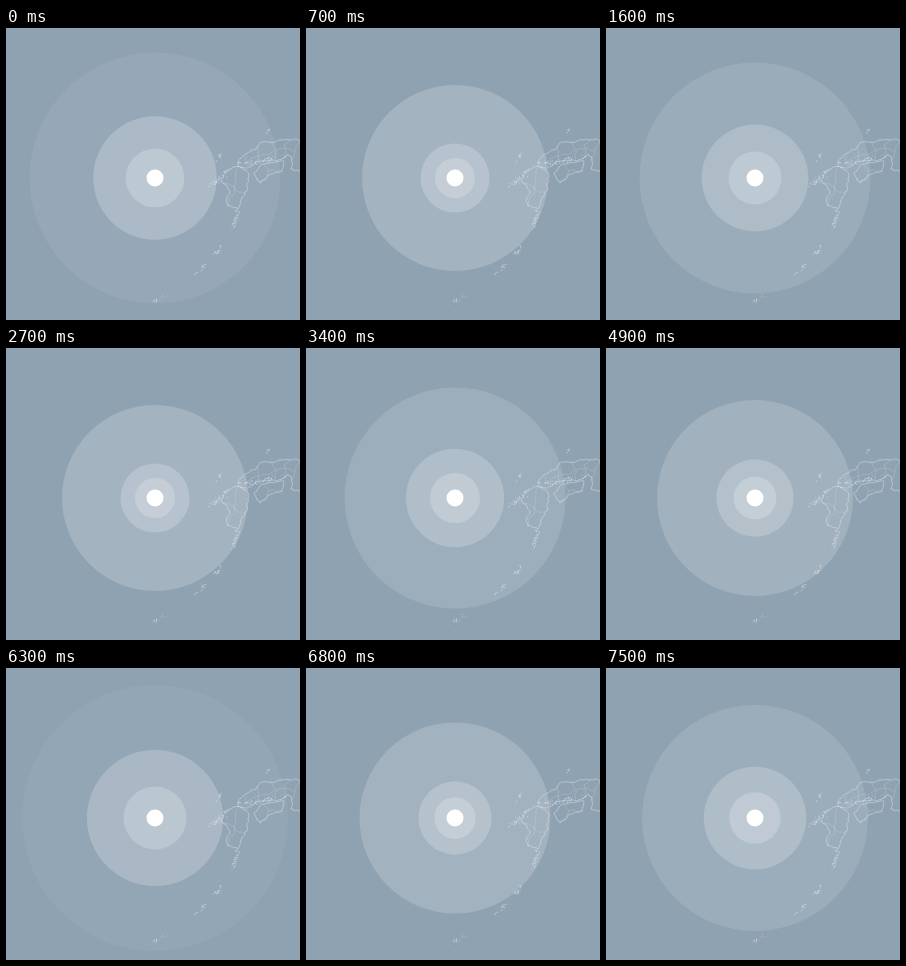
An HTML page for the animation above (7.6 s loop, 294 by 292 pixels).

```html
<!DOCTYPE html>
<html lang="en">
<head>
<meta charset="utf-8">
<title>Pulse on a map</title>
<style>
  html, body { margin: 0; width: 100%; height: 100%; overflow: hidden; background: #8fa2b2; }
  svg { display: block; width: 100%; height: 100%; }
  .coast, .border { fill: none; stroke: #f4f4fa; stroke-linejoin: round; }
  .coast { stroke-width: .7; stroke-opacity: .55; }
  .border { stroke-width: .5; stroke-opacity: .34; }
  .isles { fill: #f4f4fa; fill-opacity: .55; }
</style>
</head>
<body>
<svg viewBox="0 0 294 292">
  <g fill="#fff">
    <circle id="outer" cx="149" cy="150"/>
    <circle id="middle" cx="149" cy="150" fill-opacity=".2"/>
    <circle id="inner" cx="149" cy="150" fill-opacity=".2"/>
  </g>
  <path id="border" class="border"/>
  <path id="coast" class="coast"/>
  <path id="isles" class="isles"/>
  <circle cx="149" cy="150" r="8.5" fill="#fff"/>
</svg>
<script>
  const $ = id => document.getElementById(id);

  let seed = 11;
  const rand = () => (seed = (seed * 16807) % 2147483647) / 2147483647;
  const jitter = size => (rand() - .5) * size;
  const mix = (a, b, k) => a.map((v, i) => v + (b[i] - v) * k);

  // Fractal line: midpoints are displaced again and again.
  function fractal(a, b, depth) {
    if (!depth) return `L${b[0].toFixed(1)},${b[1].toFixed(1)}`;
    const size = Math.hypot(b[0] - a[0], b[1] - a[1]) * .35;
    const mid = mix(a, b, .5).map(v => v + jitter(size));
    return fractal(a, mid, depth - 1) + fractal(mid, b, depth - 1);
  }
  const ragged = (pts, depth) => `M${pts[0]}` +
    pts.slice(1).map((p, i) => fractal(pts[i], p, depth)).join('');

  // Point at fraction k of a polyline.
  function along(pts, k) {
    const pos = k * (pts.length - 1), i = Math.min(Math.floor(pos), pts.length - 2);
    return mix(pts[i], pts[i + 1], pos - i);
  }
  const close = pts => [...pts, pts[0]];
  const center = pts => [0, 1].map(i => pts.reduce((sum, p) => sum + p[i], 0) / pts.length);

  const north = [[232, 137], [242, 125], [256, 114], [280, 111], [294, 113]];
  const south = [[232, 138], [246, 138], [268, 132], [282, 126], [285, 141], [294, 143]];
  const shikoku = [[248, 145], [257, 136], [278, 133], [276, 143], [264, 146], [254, 155]];
  const kyushu = [[219, 143], [232, 138], [243, 147], [239, 166], [232, 181], [222, 178], [224, 163], [215, 153]];

  $('coast').setAttribute('d',
    [north, south, close(shikoku), close(kyushu)].map(c => ragged(c, 3)).join(''));

  // Inland borders: a ridge with cross lines, and spokes on the two islands.
  const cuts = [.2, .4, .6, .8, 1];
  const ridge = cuts.map(k => mix(along(north, k), along(south, k * .7), .55));
  const cross = cuts.map(k => [along(north, k), along(south, k * .7)]);
  const spokes = pts => pts.filter((p, i) => i % 2).map(p => [center(pts), p]);
  $('border').setAttribute('d',
    [ridge, ...cross, ...spokes(shikoku), ...spokes(kyushu)].map(b => ragged(b, 2)).join(''));

  function speck([x, y]) {
    const r = .4 + rand() * .5;
    return `M${(x - r).toFixed(1)},${y.toFixed(1)}l${r},${-r} ${r},${r * .8} ${-r},${r}z`;
  }
  const scatter = (a, b, spread, count) => Array.from({ length: count }, () =>
    speck(mix(a, b, rand()).map(v => v + jitter(spread)))).join('');

  // Clumps of islets strung along a curve to the south-west.
  const bend = [222, 232];
  const arc = k => mix(mix([232, 184], bend, k), mix(bend, [143, 277], k), k);
  const clumps = [.03, .14, .4, .61, .95].map(k => scatter(arc(k - .05), arc(k + .05), 4, 17));

  $('isles').setAttribute('d', [
    ...clumps,
    scatter([232, 137], [277, 129], 5, 55),
    scatter([205, 157], [222, 144], 6, 40),
    scatter([211, 134], [215, 126], 3, 13),
    scatter([260, 105], [264, 101], 2, 8)
  ].join(''));

  const LOOP = 7600, STEP = 100, PULSE = 2000, OFFSET = 1550;
  const start = performance.now();

  function draw(now) {
    const t = Math.floor((Math.max(0, now - start) % LOOP) / STEP) * STEP;
    const s = ((t + OFFSET) % PULSE) / PULSE;
    $('outer').setAttribute('r', 86.75 + 50 * s);
    $('outer').setAttribute('fill-opacity', .2 - .175 * s);
    $('middle').setAttribute('r', 29.3 + 41.9 * s);
    $('inner').setAttribute('r', 18.2 + 14.4 * s);
    requestAnimationFrame(draw);
  }
  draw(start);
</script>
</body>
</html>
```
